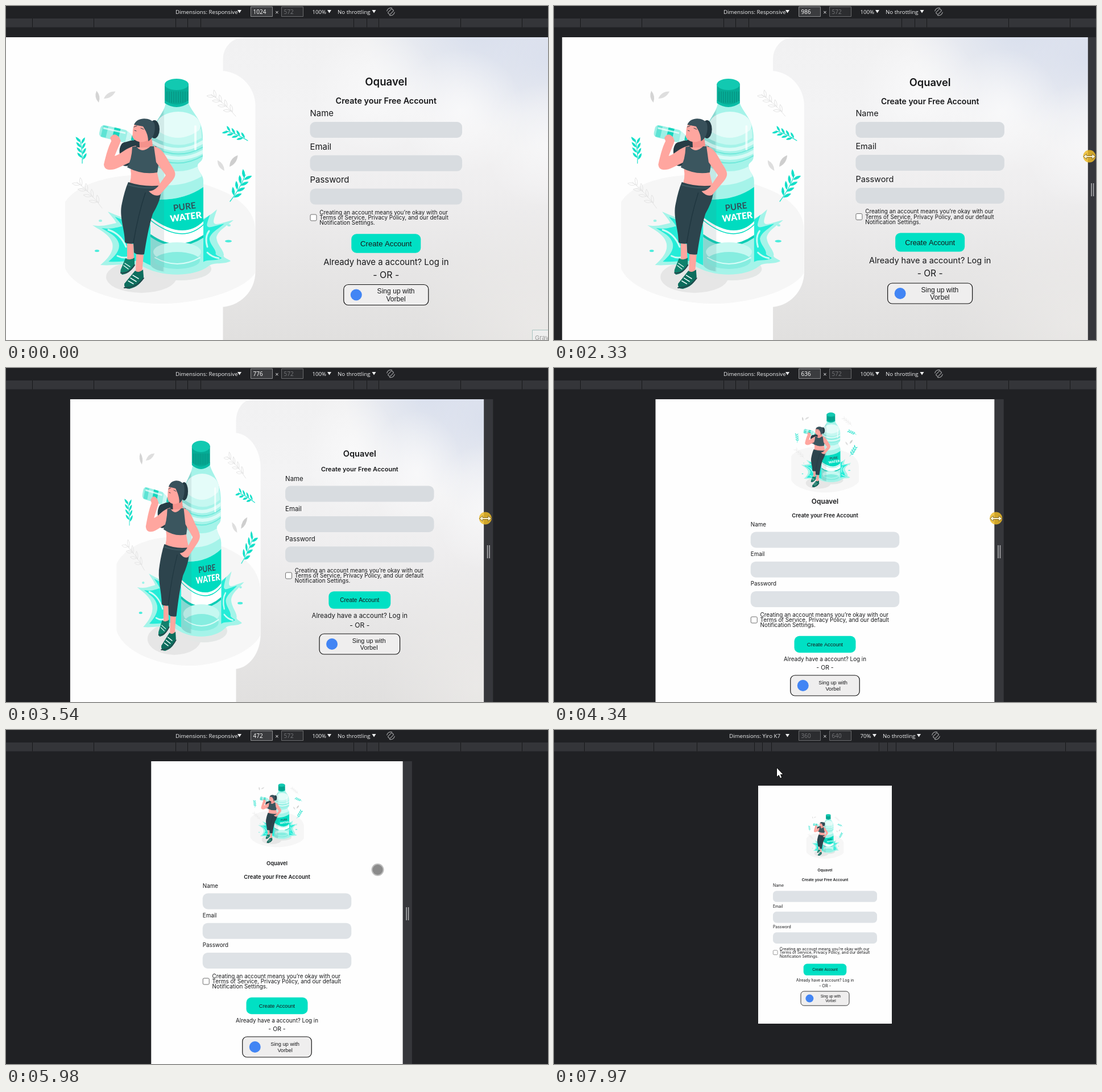
An HTML page with a canvas for the animation above (8000 ms loop, 953 by 588 pixels).

```html
<!DOCTYPE html>
<html lang="en">
<head>
<meta charset="utf-8">
<title>Responsive sign-up page</title>
<style>
html, body { margin: 0; width: 100%; height: 100%; overflow: hidden; background: #202124; }
canvas { display: block; width: 953px; height: 588px; }
</style>
</head>
<body>
<canvas id="stage" width="953" height="588"></canvas>
<script>
const ctx = document.getElementById('stage').getContext('2d');
const LOOP = 8000, MID = 476.5, TOP = 55, ZOOM = 0.938;
const UI = '"Open Sans", sans-serif', ROUND = 'Inter, sans-serif', ARIAL = '"Liberation Sans", Arial, sans-serif';
const TEAL = '#00e0c4', SKIN = '#ffa69f', DARK = '#2d444d';
const BRAND = 'Oquavel', PROVIDER = 'Vorbel', DEVICE = 'Yiro K7';

// Piecewise linear: rows are [key, ...values]
function track(rows, v) {
  if (v <= rows[0][0]) return rows[0].slice(1);
  for (let i = 1; i < rows.length; i++) {
    const a = rows[i - 1], b = rows[i];
    if (v <= b[0]) {
      const k = (v - a[0]) / (b[0] - a[0]);
      return a.slice(1).map((n, j) => n + (b[j + 1] - n) * k);
    }
  }
  return rows[rows.length - 1].slice(1);
}

function text(str, x, y, size, { font = ROUND, weight = 400, color = '#17181a', align = 'center' } = {}) {
  ctx.font = `${weight} ${size}px ${font}`;
  ctx.fillStyle = color;
  ctx.textAlign = align;
  ctx.fillText(str, x, y + size * 0.36);
}
function rect(x, y, w, h, fill) {
  ctx.fillStyle = fill;
  ctx.fillRect(x, y, w, h);
}
function box(x, y, w, h, r, fill, stroke, line = 1) {
  ctx.beginPath();
  ctx.roundRect(x, y, w, h, r);
  if (fill) { ctx.fillStyle = fill; ctx.fill(); }
  if (stroke) { ctx.strokeStyle = stroke; ctx.lineWidth = line; ctx.stroke(); }
}
function shape(d, fill) {
  ctx.fillStyle = fill;
  ctx.fill(new Path2D(d));
}
function line(d, color, width) {
  ctx.strokeStyle = color;
  ctx.lineWidth = width;
  ctx.lineCap = ctx.lineJoin = 'round';
  ctx.stroke(new Path2D(d));
}
function oval(x, y, rx, ry, fill, turn = 0) {
  ctx.beginPath();
  ctx.ellipse(x, y, rx, ry, turn, 0, Math.PI * 2);
  ctx.fillStyle = fill;
  ctx.fill();
}

// ---------- illustration ----------
function leaf(x, y, angle, len, color, outline) {
  ctx.save();
  ctx.translate(x, y);
  ctx.rotate(angle);
  const d = `M0 0Q${len * .5} ${-len * .34} ${len} 0Q${len * .5} ${len * .3} 0 0Z`;
  outline ? line(d, color, 0.7) : shape(d, color);
  ctx.restore();
}
function sprig(x, y, angle, len, pairs, leafLen, color, outline) {
  ctx.save();
  ctx.translate(x, y);
  ctx.rotate(angle);
  line(`M0 0Q${len / 2} ${len * .08} ${len} 0`, color, outline ? 0.7 : 1.2);
  for (let i = 1; i <= pairs; i++) {
    const at = len * i / (pairs + .5);
    leaf(at, 1, -0.65, leafLen, color, outline);
    leaf(at - 3, 2, 0.6, leafLen, color, outline);
  }
  ctx.restore();
}

function splash() {
  const d = 'M152 386C172 389 183 384 194 382C190 374 184 369 179 362C200 371 222 380 240 378L335 378C350 374 359 369 371 358C365 377 362 383 370 384C380 383 391 378 400 377C386 389 372 396 370 408C371 421 382 428 383 438C380 443 393 446 395 449C382 456 366 450 356 458C330 478 270 478 236 456C212 452 190 458 166 456C180 444 190 432 187 418C183 403 168 396 152 386Z';
  shape(d, '#a4f4e9');
  ctx.save();
  ctx.translate(275, 418);
  ctx.scale(.87, .84);
  ctx.translate(-275, -418);
  shape(d, '#25ecd8');
  ctx.restore();
  line('M180 394Q202 401 211 424M196 440Q211 447 222 438M357 396Q349 407 354 424M374 444Q362 442 354 434', '#c9fbf4', 3);
  oval(160, 431, 4, 2, '#4decdc');
  oval(391, 414, 6, 2.2, '#4decdc');
  oval(392, 386, 3, 2, '#9df3e8');
  oval(166, 378, 3, 2, '#9df3e8');
}

function bottle() {
  const body = new Path2D('M281 166L320 166C321 183 345 196 346 228L346 264C346 276 337 274 337 282C337 292 347 296 347 308L347 455C340 474 262 474 254 456L254 240C254 203 281 192 281 166Z');
  ctx.save();
  ctx.fillStyle = '#a5f3e9';
  ctx.fill(body);
  ctx.clip(body);
  rect(254, 165, 22, 310, '#8fe6dc');
  oval(303, 211, 39, 25, '#e4fcf9');
  shape('M262 216Q302 248 343 216L344 232Q305 258 258 230Z', '#c6f8f1');
  line('M258 240Q304 266 347 239M258 256Q304 280 347 256', '#d8fbf6', 6);
  line('M258 248Q304 273 347 248M258 265Q304 289 347 263', '#6fe9da', 2);
  shape('M260 282Q304 300 338 282L344 300Q304 323 258 312Z', '#d3faf5');
  shape('M254 340Q310 345 348 318V407Q300 437 254 405Z', '#fff');
  shape('M254 340Q310 345 348 318V378Q312 415 254 372Z', '#00dcc0');
  line('M254 377Q310 421 348 384', '#00dcc0', 1.5);
  line('M254 404Q300 437 348 405', '#0bcdb5', 4);
  oval(301, 433, 42, 17, '#c6f8f1');
  oval(301, 448, 40, 15, '#86ede0');
  line('M262 443Q301 465 341 443', '#d9fcf7', 2);
  shape('M254 170H278V475H254Z', 'rgba(90,120,125,.13)');
  line('M333 212V252', 'rgba(255,255,255,.7)', 4);
  ctx.restore();
  shape('M279 137V168Q300 181 321 168V137Z', '#06ac96');
  for (let x = 283; x < 321; x += 4) line(`M${x} 151V170`, '#078b7b', 1);
  oval(300, 138, 21, 10, '#12c9b1');
  shape('M279 166Q300 181 321 166V171Q300 185 279 171Z', '#08bda6');
  ctx.save();
  ctx.translate(315, 362);
  ctx.rotate(-0.13);
  text('PURE', 0, -9, 15.5, { font: 'Lato, sans-serif', weight: 700, color: '#31525b' });
  text('WATER', 0, 9, 16, { font: 'Lato, sans-serif', weight: 900, color: '#fff' });
  ctx.restore();
}

function woman() {
  shape('M247 231C228 236 213 236 204 242C194 256 205 266 199 278C213 286 222 281 225 265C236 260 252 253 247 231Z', '#263c45');
  // raised arm
  shape('M229 246C212 248 201 262 191 264L201 240L189 232C181 242 176 262 172 279C173 291 187 290 199 284L225 272Z', SKIN);
  // small bottle
  ctx.save();
  ctx.translate(165, 219);
  ctx.rotate(0.23);
  box(0, -11, 50, 22, 7, '#9df0e6');
  rect(4, -10, 9, 20, '#5de3d4');
  rect(24, -11, 11, 22, '#14d6be');
  shape('M48 -10L59 -4V4L48 10Z', '#cbf8f3');
  rect(57, -4, 5, 8, '#15cdb6');
  rect(5, -7, 40, 3, 'rgba(255,255,255,.7)');
  ctx.restore();
  shape('M183 232Q190 221 199 231L202 238Q196 246 187 242Z', SKIN);
  // head
  oval(261, 217, 9, 16, '#243a43');
  shape('M234 228L235 249Q248 259 258 246L255 225Z', '#f4928c');
  shape('M227 207C221 216 224 224 222 229C225 239 239 242 248 237C258 226 258 209 246 203Z', SKIN);
  shape('M225 209C231 194 255 196 261 207C264 222 258 234 250 238C250 227 246 220 241 212Z', '#38515b');
  line('M225 213L230 211M237 215L242 217M226 219L229 220', '#2b3d45', 1);
  // torso
  shape('M224 247Q241 252 262 246L270 260L266 294Q268 305 272 317H215Q222 303 219 288Z', SKIN);
  shape('M222 248L229 247Q239 261 254 247L264 247Q272 262 266 293Q240 298 213 284Q221 271 222 248Z', '#3b565f');
  // pants
  shape('M215 310Q242 319 271 316C276 333 266 352 258 366C251 389 247 411 243 437Q232 440 225 434L224 418Q215 421 209 416C209 392 198 371 204 347C207 333 210 321 215 310Z', DARK);
  line('M245 329Q232 368 224 417', '#203740', 1.6);
  line('M215 315Q243 323 272 319', '#3d5861', 2);
  // hip arm
  shape('M260 247C276 250 281 266 291 281C299 293 300 298 292 308L270 333Q260 336 251 326Q261 325 267 318L281 298L264 275Z', SKIN);
  // legs and shoes
  shape('M213 418L224 419L225 446L213 448ZM229 437L242 438L239 470L228 468Z', SKIN);
  shape('M210 444Q218 449 226 443L226 455Q219 471 204 473Q199 468 203 461Z', '#10816c');
  shape('M227 466Q233 471 241 464L242 477Q237 493 217 498Q207 498 208 489Z', '#0d6d5d');
  line('M202 470Q216 472 226 456M208 496Q230 496 242 479', '#23474b', 2);
  line('M209 453L218 459M207 457L215 463M223 474L233 480M219 479L229 485M215 484L224 489', '#e9fbf8', 1.5);
}

function illustration() {
  ctx.save();
  ctx.beginPath();
  ctx.rect(104, 110, 335, 420);
  ctx.clip();
  shape('M104 345C120 320 160 305 200 300C270 290 345 308 390 330C425 350 438 370 438 395V470C420 500 340 524 275 524C200 524 120 500 104 462Z', '#f6f6f6');
  oval(238, 477, 62, 28, '#e6e6e6');
  oval(306, 463, 55, 20, '#e3e7e6');
  leaf(163, 170, -1.75, 21, '#d4d4d4');
  leaf(172, 163, -0.55, 24, '#dedede');
  leaf(384, 290, -2.15, 22, '#dedede');
  leaf(393, 283, -0.95, 25, '#cecece');
  sprig(404, 194, -2.42, 58, 4, 13, '#d9d9d9', true);
  sprig(169, 356, -2.34, 64, 4, 14, '#dcdcdc', true);
  sprig(425, 237, -2.72, 42, 4, 12, '#12dfc8');
  sprig(134, 277, -1.67, 42, 4, 13, '#12dfc8');
  sprig(394, 344, -1.05, 54, 4, 16, '#12dfc8');
  splash();
  bottle();
  woman();
  ctx.restore();
}

// ---------- page ----------
function glow(x, y, r, rgb, alpha) {
  const g = ctx.createRadialGradient(x, y, 0, x, y, r);
  g.addColorStop(0, `rgba(${rgb},${alpha})`);
  g.addColorStop(1, `rgba(${rgb},0)`);
  rect(x - r, y - r, r * 2, r * 2, g);
}
function sky() {
  ctx.save();
  ctx.beginPath();
  ctx.roundRect(381.5, TOP, 600, 560, [38, 0, 0, 0]);
  ctx.clip();
  const g = ctx.createLinearGradient(0, TOP, 0, 588);
  ['#f1f1f2', '#f3f3f4', '#efeeef', '#e7e6e6', '#e1e0df'].forEach((c, i) => g.addColorStop(i / 4, c));
  rect(380, TOP, 600, 540, g);
  glow(820, 25, 190, '207,216,235', .75);
  glow(960, 90, 170, '212,219,236', .75);
  glow(650, 150, 110, '250,250,251', .8);
  glow(800, 185, 110, '250,250,251', .8);
  glow(950, 245, 110, '249,249,250', .7);
  glow(940, 560, 220, '239,237,235', .6);
  ctx.restore();
  box(340, 114, 98.5, 416, [0, 62, 62, 0], '#fefefe');
}

// width, font, title size, then vertical places: title, subtitle, label, field, field gap, terms, button, login, or, provider
const WIDE = [
  [776, 11.4, 14.6, 151, 178.5, 194.5, 207.5, 53.4, 365.5, 408.5, 435.5, 453, 486],
  [864, 12.8, 16.3, 142, 172.5, 191, 206, 56, 369.5, 413, 442.5, 463, 496.5],
  [986, 14.5, 18.3, 134.5, 168, 188.5, 204, 58, 371, 416, 447.5, 470.5, 506],
  [1024, 14.9, 18.6, 133, 167, 188.5, 204, 58.8, 372.5, 418, 450.5, 473, 508.5]
];
const NARROW = [
  [472, 9.8, 9.3, 235, 259, 274, 287.5, 52.2, 442.5, 485.5, 511.5, 526.5, 558],
  [636, 9.8, 11.9, 235, 260, 275, 288.5, 52.2, 443.5, 486.5, 512.5, 527, 559]
];

function form(cx, width, rows) {
  const [font, titleSize, title, sub, label, field, gap, terms, button, login, or, provider] = track(rows, width);
  const wide = rows === WIDE;
  const fieldW = track([[986, 261.5], [1024, 267.5]], width)[0];
  const left = cx - fieldW / 2;
  text(BRAND, cx, title, titleSize, { weight: 600 });
  text('Create your Free Account', cx, sub, font * .965, { weight: 600 });
  ['Name', 'Email', 'Password'].forEach((name, i) => {
    text(name, left, label + gap * i, font, { align: 'left' });
    box(left, field + gap * i, fieldW, 28, 9, wide ? '#d8dce0' : '#dee2e6');
  });
  box(left + .5, terms - 5.5, 11, 11, 2, '#fff', '#6d6d6d');
  ['Creating an account means you’re okay with our', 'Terms of Service, Privacy Policy, and our default', 'Notification Settings.']
    .forEach((row, i) => text(row, left + 16.8, terms + (i - 1) * 9.3, 9.9, { align: 'left' }));

  const btnW = Math.max(108, Math.min(122, font * 9.55)), btnH = 21.5 + font * .8;
  box(cx - btnW / 2, button - btnH / 2, btnW, btnH, 9, TEAL);
  text('Create Account', cx, button, Math.max(9.2, font * .88), { font: ARIAL });
  text('Already have a account? Log in', cx, login, font);
  text('- OR -', cx, or, font * 1.07);

  const signW = Math.min(150, 12.5 * font), signFont = Math.min(12.1, font * .95);
  box(cx - signW / 2 + .5, provider - 18, signW - 1, 36, 8, '#efeeee', '#111', 1.2);
  oval(cx - signW / 2 + 22.5, provider, 10, 10, '#4285f4');
  text('Sing up with', cx + signW * .115, provider - signFont * .56, signFont, { font: ARIAL });
  text(PROVIDER, cx + signW * .115, provider + signFont * .58, signFont, { font: ARIAL });
}

function narrowContent(width) {
  const [scale, top] = track([[472, .283, 94], [636, .356, 78]], width);
  ctx.save();
  ctx.translate(MID, top);
  ctx.scale(scale, scale);
  ctx.translate(-271, -127);
  illustration();
  ctx.restore();
  form(MID, width, NARROW);
}

function responsivePage(width) {
  const w = width * ZOOM, left = MID - w / 2, edge = left + w;
  ctx.save();
  ctx.beginPath();
  ctx.rect(left, TOP, w, 540);
  ctx.clip();
  rect(left, TOP, w, 540, '#fefefe');
  if (width > 768) {
    ctx.save();
    ctx.translate(MID, 0);
    ctx.scale(width / 1024, 1);
    ctx.translate(-MID, 0);
    sky();
    illustration();
    ctx.restore();
    form(MID + width * .1873, width, WIDE);
  } else narrowContent(width);
  ctx.restore();
  rect(edge, TOP, 16, 540, '#36373b');
  for (const dx of [5.5, 9]) rect(edge + dx, 312, 1.5, 23, '#b4b5b7');
}

function devicePage() {
  rect(359, 98, 235, 419, '#fefefe');
  ctx.save();
  ctx.translate(MID, 246.5);
  ctx.scale(.7, .7);
  ctx.translate(-MID, -235);
  narrowContent(472);
  ctx.restore();
}

// ---------- browser tools ----------
function numberBox(x, value, active) {
  box(x + .5, 1.5, 38, 17, 0, active ? '#3b3c3f' : '#2c2d30', active ? '#8b8c8e' : '#6a6b6d');
  text(value, x + 4.5, 10.5, 10, { font: UI, color: active ? '#fff' : '#77787b', align: 'left' });
}
function menuLabel(str, x, arrowX) {
  text(str, x, 10.5, 9.7, { font: UI, color: '#f1f2f3', align: 'left' });
  shape(`M${arrowX} 7H${arrowX + 7}L${arrowX + 3.5} 12.5Z`, '#f1f2f3');
}
function toolbar(width, device) {
  rect(0, 0, 953, TOP, '#202124');
  rect(0, 22, 953, 15.5, '#343539');
  const ticks = device ? [94.5, 110, 124.5, 225.5, 301, 423] : [134.5, 157.5, 178.5, 322.5, 430.5];
  for (const d of ticks) for (const s of [-1, 1]) rect(Math.floor(MID + s * d), 22, 1, 15.5, '#18191b');
  device ? menuLabel('Dimensions: ' + DEVICE, 308, 407) : menuLabel('Dimensions: Responsive', 298, 407);
  numberBox(430, device ? '360' : String(Math.round(width)), !device);
  text('×', 476.5, 11, 11, { font: UI, color: '#e4e5e7' });
  numberBox(484, device ? '640' : '572', false);
  menuLabel(device ? '70%' : '100%', 538.5, device ? 560 : 565);
  menuLabel('No throttling', device ? 578 : 583, device ? 638 : 643.5);
  ctx.save();
  ctx.translate(device ? 671.5 : 676.5, 10);
  ctx.rotate(Math.PI / 4);
  box(-2.5, -5, 5, 10, 1, null, '#9a9b9d', 1.2);
  line('M-5.5 4A7 7 0 0 1 -3 -6M5.5 -4A7 7 0 0 1 3 6', '#9a9b9d', 1.2);
  ctx.restore();
}
function deviceMenu(y) {
  rect(293, 20, 233, 437, '#292a2d');
  const rows = ['Responsive', DEVICE];
  for (let i = 1; i <= 15; i++) rows.push((i < 9 ? 'Phone ' : 'Tablet ') + i);
  rows.push('Edit…');
  rows.forEach((name, i) => {
    const top = 20 + i * 23 + (i > 0) * 11 + (i > 16) * 11;
    if (y >= top && y < top + 23) rect(293, top, 233, 23, '#4d5157');
    text(name, 300, top + 11.5, 14, { font: UI, color: '#eeeff0', align: 'left' });
  });
  for (const top of [48, 427]) rect(293, top, 233, 1, '#5a5c60');
}
function resizePointer(x) {
  oval(x, 264.5, 11, 11, 'rgba(235,186,40,.85)');
  ctx.save();
  ctx.translate(x, 265);
  const d = 'M-10 0L-5 -4V-1H5V-4L10 0L5 4V1H-5V4Z';
  line(d, '#6b541b', 1.4);
  shape(d, '#fff5d0');
  ctx.restore();
}
function arrow(x, y) {
  ctx.save();
  ctx.translate(x, y);
  const d = 'M0 0V15L3.4 12L6 17.5L8.2 16.5L5.8 11H10.3Z';
  line(d, '#000', 1.5);
  shape(d, '#fff');
  ctx.restore();
}

const WIDTH = [[1910, 1024], [2330, 986], [2650, 926], [3080, 864], [3470, 788], [3540, 776], [4340, 636], [5150, 523], [5600, 472]];
const POINTER = [[5600, 700, 264], [5980, 653.5, 246], [6070, 653.5, 246], [6770, 406, 19], [6900, 406, 19], [7570, 392, 67]];

function draw(t) {
  const width = track(WIDTH, t)[0], device = t >= 7840;
  const [px, py] = track(POINTER, t);
  rect(0, 0, 953, 588, '#202124');
  toolbar(width, device);
  device ? devicePage() : responsivePage(width);
  if (t < 70) {
    box(925.5, 570.5, 40, 30, 0, '#eeeeee', '#a9c4c1');
    text('Gray', 930, 584, 11, { color: '#9a9a9a', align: 'left' });
  }
  if (t >= 6900 && !device) deviceMenu(py);
  if (t >= 1910 && t < 5600) resizePointer(MID + width * ZOOM / 2 + 2.5);
  else if (t >= 5600 && t < 6900) {
    oval(px, py, 11, 11, '#bdbdbd');
    oval(px, py, 9, 9, '#8b8b8b');
  } else if (t >= 6900) arrow(px, py);
}

const start = performance.now();
function tick() {
  draw((performance.now() - start) % LOOP);
  requestAnimationFrame(tick);
}
tick();
</script>
</body>
</html>
```
